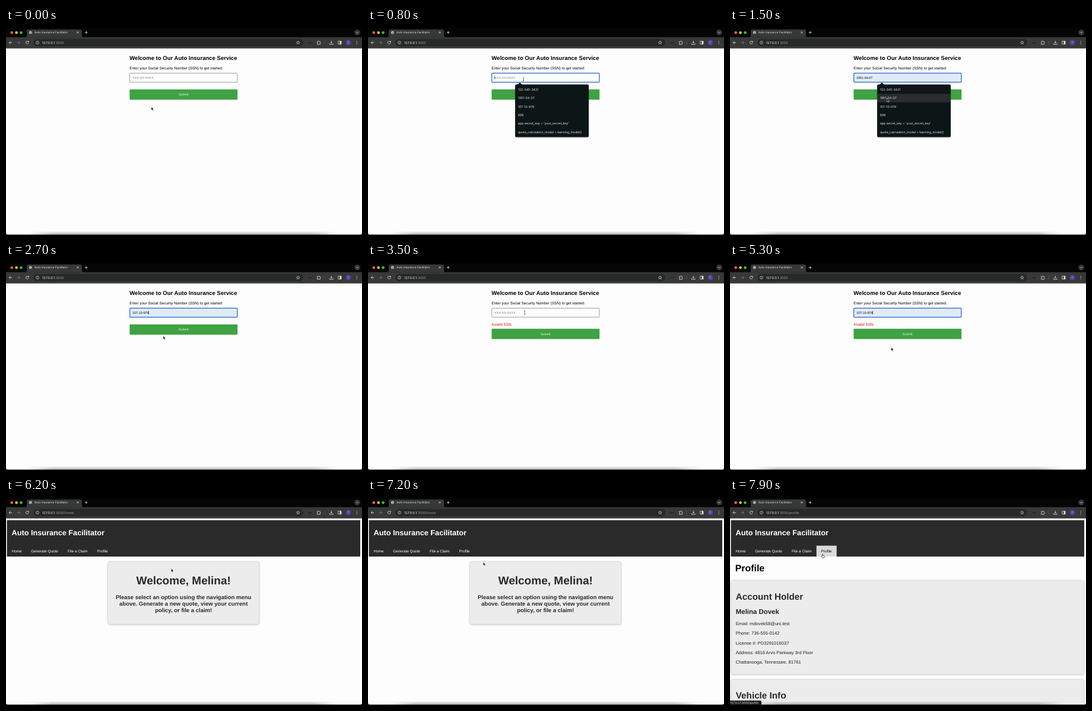
Write an HTML page that moves like this. It is 600 by 350 pixels and loops after 8 s.

```html
<!DOCTYPE html>
<html lang="en">
<head>
<meta charset="utf-8">
<title>Auto Insurance Facilitator</title>
<style>
  html, body { margin: 0; width: 100%; height: 100%; overflow: hidden; background: #fdfdfd; }
  svg { display: block; width: 600px; height: 350px; }
  text { font-family: "Liberation Sans", Arial, sans-serif; text-rendering: geometricPrecision; white-space: pre; }
  text.ui { font-family: Inter, Roboto, sans-serif; }
</style>
</head>
<body>
<svg viewBox="0 0 600 350">
  <defs>
    <linearGradient id="dock" x2="0" y2="1">
      <stop offset="0" stop-color="#888" stop-opacity="0"/>
      <stop offset="1" stop-color="#888" stop-opacity=".65"/>
    </linearGradient>
    <linearGradient id="fadeSides">
      <stop offset="0" stop-color="#000"/>
      <stop offset=".08" stop-color="#fff"/>
      <stop offset=".92" stop-color="#fff"/>
      <stop offset="1" stop-color="#000"/>
    </linearGradient>
    <mask id="sides"><rect x="36" y="340" width="524" height="10" fill="url(#fadeSides)"/></mask>
    <filter id="soft" x="-10%" y="-10%" width="120%" height="125%">
      <feDropShadow dx="0" dy="1" stdDeviation="1.2" flood-opacity=".22"/>
    </filter>
  </defs>
  <g id="page"></g>
  <g id="chrome"></g>
  <g id="overlay"></g>
</svg>
<script>
const LOOP = 8000, STEP = 100;
const INK = '#2a2a2a', WHITE = '#fff';
const SUGGESTIONS = ['123-345-3421', '1951-04-07', '107-10-979', '898',
  "app.secret_key = 'your_secret_key'", 'quote_calculation_model = learning_model()'];
const LIST = { x: 248, y: 95.5, w: 124, h: 89, top: 97, row: 14.33 };

// Pointer path: time, x, y
const POINTER = [
  [0, 245, 133.3], [500, 262, 84], [700, 262, 84], [1100, 263, 102], [1500, 264.6, 119],
  [1600, 264.6, 123.5], [1700, 264.6, 123.5], [2100, 265, 133], [2400, 265, 132],
  [2700, 265, 123.3], [3000, 268, 113], [3200, 268, 113], [3500, 264, 84], [3800, 264, 84],
  [4200, 267.4, 146.8], [4400, 267.4, 146.8], [4700, 268, 133], [4900, 268, 133],
  [5200, 271.7, 142.8], [5300, 271.7, 142.8], [5700, 275, 120], [6000, 276, 119.5],
  [6200, 278.6, 119.3], [6600, 270, 126], [7000, 215, 116], [7500, 156, 94.6], [8000, 156, 94.6]
];

const STATES = [
  { at: 0, page: 'login' },
  { at: 700, page: 'login', focus: true, open: true },
  { at: 2400, page: 'login', focus: true, value: SUGGESTIONS[2] },
  { at: 3300, page: 'login', error: true },
  { at: 3800, page: 'login', error: true, focus: true, open: true },
  { at: 5000, page: 'login', error: true, focus: true, value: SUGGESTIONS[2] },
  { at: 6200, page: 'home' },
  { at: 7800, page: 'profile' }
];
const LINK_STATUS_AT = 7700;

const text = (x, y, size, fill, str, attrs = '') =>
  `<text x="${x}" y="${y}" font-size="${size}" fill="${fill}" ${attrs}>${str}</text>`;
const bold = (x, y, size, fill, str, attrs = '') => text(x, y, size, fill, str, 'font-weight="700" ' + attrs);
const ui = (x, y, size, fill, str, attrs = '') => text(x, y, size, fill, str, 'class="ui" ' + attrs);
const rect = (x, y, w, h, fill, attrs = '') =>
  `<rect x="${x}" y="${y}" width="${w}" height="${h}" fill="${fill}" ${attrs}/>`;
const disc = (x, y, r, fill, attrs = '') => `<circle cx="${x}" cy="${y}" r="${r}" fill="${fill}" ${attrs}/>`;
const line = (d, color = '#e3e3e3', width = .8) =>
  `<path d="${d}" fill="none" stroke="${color}" stroke-width="${width}" stroke-linejoin="round"/>`;
const MIDDLE = 'text-anchor="middle"';

function pointerAt(t) {
  const i = POINTER.findIndex(p => p[0] > t);
  const [t0, x0, y0] = POINTER[i - 1], [t1, x1, y1] = POINTER[i];
  const u = (t - t0) / (t1 - t0), e = u * u * (3 - 2 * u);
  return { x: x0 + (x1 - x0) * e, y: y0 + (y1 - y0) * e };
}

const inside = (p, x, y, w, h) => p.x >= x && p.x < x + w && p.y >= y && p.y < y + h;

function hoveredRow(state, p) {
  if (!state.open || !inside(p, LIST.x, LIST.top, LIST.w, LIST.row * SUGGESTIONS.length)) return -1;
  return Math.floor((p.y - LIST.top) / LIST.row);
}

function browser(path) {
  const globe = disc(41.4, 7.5, 2.5, '#d0d0d0') +
    line('M39.6 6.3l1.8 .9l-.6 1.6M42 5.2l.4 1.4l1.3 .6M41.6 9.9l.6-1.3l1.4-.2', '#3a3a3a', .6);
  const star = Array.from({ length: 10 }, (_, i) => {
    const a = i * Math.PI / 5, r = i % 2 ? 1.3 : 3;
    return `${492.3 + r * Math.sin(a)},${24.8 - r * Math.cos(a)}`;
  }).join(' ');
  const dots = [22.3, 24.7, 27.1].map(y => disc(591.3, y, .6, '#e3e3e3')).join('');
  return rect(0, 0, 600, 34.3, '#050505') +
    rect(0, 15.5, 600, 18.8, '#373838') +
    '<path d="M32 15.8Q35 15.8 35 12.8V5.5Q35 2.5 38 2.5H125Q128 2.5 128 5.5V12.8Q128 15.8 131 15.8Z" fill="#373838"/>' +
    ['#ff5f57', '#febc2e', '#28c840'].map((c, i) => disc(9.7 + i * 7.9, 7.8, 2.35, c)).join('') +
    globe + ui(48, 9.2, 4.7, '#e6e6e6', 'Auto Insurance Facilitator') +
    line('M119.4 5.9l3.2 3.2m0-3.2l-3.2 3.2M135.2 5.2v4.8m-2.4-2.4h4.8') +
    disc(592, 7.6, 4.9, '#373838') + line('M590.3 6.9l1.7 1.6l1.7-1.6') +
    rect(46, 18.4, 455, 12.5, '#272828', 'rx="6.2"') +
    line('M10 24.7H5.2m2.3-2.4l-2.4 2.4l2.4 2.4') +
    line('M18.6 24.7h4.8m-2.3-2.4l2.4 2.4l-2.4 2.4', '#858585') +
    line('M37.7 23.1a2.4 2.4 0 1 0 .4 2.2M38.2 21.9v1.9h-1.9') +
    disc(53, 24.7, 2.5, 'none', 'stroke="#dcdcdc" stroke-width=".65"') + line('M53 24.3v1.8M53 23v.7', '#dcdcdc', .65) +
    ui(61, 26.7, 5.56, '#ededed', `127.0.0.1<tspan fill="#9a9a9a">:3000${path}</tspan>`) +
    `<polygon points="${star}" fill="none" stroke="#dcdcdc" stroke-width=".65"/>` +
    [510.2, 512.3, 514.4].map(x => disc(x, 24.9, .75, '#0c0c0c')).join('') +
    line('M524.6 22.9h1.6a.9.9 0 0 1 1.8 0h1.4v1.6a.9.9 0 0 1 0 1.8v1.3h-4.8v-1.4a.9.9 0 0 0 0-1.8z') +
    line('M537.3 21.5v6.4', '#606060', .6) +
    line('M548.3 21.6v4m-1.8-1.7l1.8 1.8l1.8-1.8M545.4 26v1.7h5.8v-1.7') +
    line('M559.8 22.2h5.2v5h-5.2z') + rect(562.6, 22.2, 2.4, 5, '#e3e3e3') +
    disc(577, 24.7, 4.4, '#5941a5') + ui(577, 26.3, 4.3, '#e6e0f5', 'T', MIDDLE) + dots;
}

function loginPage(state, p, t) {
  const row = hoveredRow(state, p);
  const value = row >= 0 ? SUGGESTIONS[row] : state.value;
  const buttonY = state.error ? 111.2 : 103.8;
  const overButton = !state.open && inside(p, 208.4, buttonY, 181.8, 17.4);
  const caretOn = state.focus && (t - state.at) % 1000 < 500;
  const caretX = state.value ? 240.4 : 213.2;

  let out = bold(208.3, 54.1, 9.54, '#000', 'Welcome to Our Auto Insurance Service') +
    text(208.3, 70.2, 6.37, '#000', 'Enter your Social Security Number (SSN) to get started:') +
    rect(208.7, 76.4, 181.2, 15.2, value ? '#e0eafa' : WHITE,
      `rx="1" stroke="${state.focus ? '#2463c4' : '#858585'}" stroke-width="${state.focus ? 1.2 : .8}"`) +
    text(213.2, 85.8, 5.29, value ? '#000' : '#757575', value || 'XXX-XX-XXXX');
  if (caretOn) out += rect(caretX, 81, .6, 5.8, '#000');
  if (state.error) out += text(208.3, 106.3, 6.37, '#e00b0b', 'Invalid SSN.');
  out += rect(208.4, buttonY, 181.8, 17.4, overButton ? '#3b993f' : '#3fa243') +
    text(299.3, buttonY + 10.4, 5.29, '#eef8ee', 'Submit', MIDDLE);

  if (state.open) {
    out += `<g filter="url(#soft)">` + rect(LIST.x, LIST.y, LIST.w, LIST.h, '#101314', 'rx="2"') +
      '<path d="M251.8 96L256 92.2L260.2 96Z" fill="#101314"/></g>';
    if (row >= 0) out += rect(LIST.x, LIST.top + row * LIST.row, LIST.w, LIST.row, '#2a2c2d');
    out += SUGGESTIONS.map((s, i) => ui(252.8, 105.9 + i * LIST.row, 5.16, '#e8e8e8', s)).join('');
  }
  return { out, hand: overButton };
}

const card = (x, y, w, h) => rect(x, y, w, h, '#ececec', 'rx="3.5" stroke="#cfcfcf" stroke-width=".6" filter="url(#soft)"');

function siteHeader(p) {
  const over = inside(p, 145.7, 81, 34, 18);
  const links = [[9.6, 'Home'], [42.3, 'Generate Quote'], [104, 'File a Claim'], [153.6, 'Profile']];
  return {
    hand: over,
    out: rect(1.5, 37.5, 595.5, 61.5, '#2a2a2a') +
      bold(9.5, 63.3, 12.7, WHITE, 'Auto Insurance Facilitator') +
      (over ? rect(145.7, 80.6, 34, 18.4, '#dadada') : '') +
      links.map(([x, name], i) => text(x, 92, 6.35, over && i === 3 ? '#000' : WHITE, name)).join('')
  };
}

function homePage() {
  const lines = ['Please select an option using the navigation menu',
    'above. Generate a new quote, view your current', 'policy, or file a claim!'];
  return card(171.6, 107.2, 255.2, 106) +
    bold(299.2, 145.7, 19.05, INK, 'Welcome, Melina!', MIDDLE) +
    lines.map((s, i) => bold(299.2, 171.3 + i * 10.95, 9.52, INK, s, MIDDLE)).join('');
}

function profilePage() {
  const rows = ['Email: mdovek58@uni.test', 'Phone: 736-555-0142', 'License #: PD3291016037',
    'Address: 4816 Arvo Parkway 3rd Floor', 'Chattanooga, Tennessee, 81761'];
  return bold(8.8, 124.1, 15.87, '#000', 'Profile') +
    card(1.7, 139, 595, 159) + card(1.7, 306.5, 595, 80) +
    bold(9.8, 171.5, 15.24, INK, 'Account Holder') +
    bold(9.8, 195.7, 11.43, '#222', 'Melina Dovek') +
    rows.map((s, i) => text(9.8, 214.8 + i * 16.4, 7.62, '#222', s)).join('') +
    bold(9.8, 339.2, 15.24, INK, 'Vehicle Info');
}

function pointer({ x, y }, kind) {
  const shapes = {
    arrow: '<path d="M0 0V5.8L1.4 4.6L2.3 6.6L3.2 6.2L2.3 4.3H4.1Z" fill="#000" stroke="#fff" stroke-width=".5"/>',
    hand: '<path d="M-.6 .5Q0-.4 .6 .5V2.7L3 3.2Q3.5 3.5 3.3 4.7L2.7 6.7H-.5L-2.1 4.2Q-2 3.3-.6 4.2Z" fill="#fff" stroke="#000" stroke-width=".6"/>',
    beam: line('M-1.1-3Q0-3 0-2.2V2.2Q0 3-1.1 3M1.1-3Q0-3 0-2.2M0 2.2Q0 3 1.1 3', '#111', .6)
  };
  return `<g transform="translate(${x} ${y})">${shapes[kind]}</g>`;
}

const layer = id => document.getElementById(id);

function draw(t) {
  const state = STATES.filter(s => s.at <= t).pop();
  const p = pointerAt(t);
  let view, path = '';
  if (state.page === 'login') {
    view = loginPage(state, p, t);
  } else {
    view = siteHeader(p);
    view.out += state.page === 'home' ? homePage() : profilePage();
    path = '/' + state.page;
  }
  const overField = state.page === 'login' && inside(p, 208, 76, 182, 16);
  const kind = view.hand ? 'hand' : overField ? 'beam' : 'arrow';
  const status = t >= LINK_STATUS_AT
    ? '<path d="M0 342.4H51Q53 342.4 53 344.4V350H0Z" fill="#1c1d1d"/>' +
      ui(.6, 348, 4.76, '#f0f0f0', '127.0.0.1:3000/profile') : '';

  layer('page').innerHTML = rect(0, 34, 600, 316, '#fdfdfd') + view.out;
  layer('chrome').innerHTML = browser(path);
  layer('overlay').innerHTML = rect(36, 343.5, 524, 6, 'url(#dock)', 'mask="url(#sides)"') +
    '<path d="M0 347Q.3 349.3 3 349.3H597Q599.7 349.3 600 347V350H0Z" fill="#111"/>' +
    status + pointer(p, kind);
}

const start = performance.now();
let shown = -1;
function tick() {
  const t = Math.floor(((performance.now() - start) % LOOP) / STEP) * STEP;
  if (t !== shown) draw(shown = t);
  requestAnimationFrame(tick);
}
tick();
</script>
</body>
</html>
```
